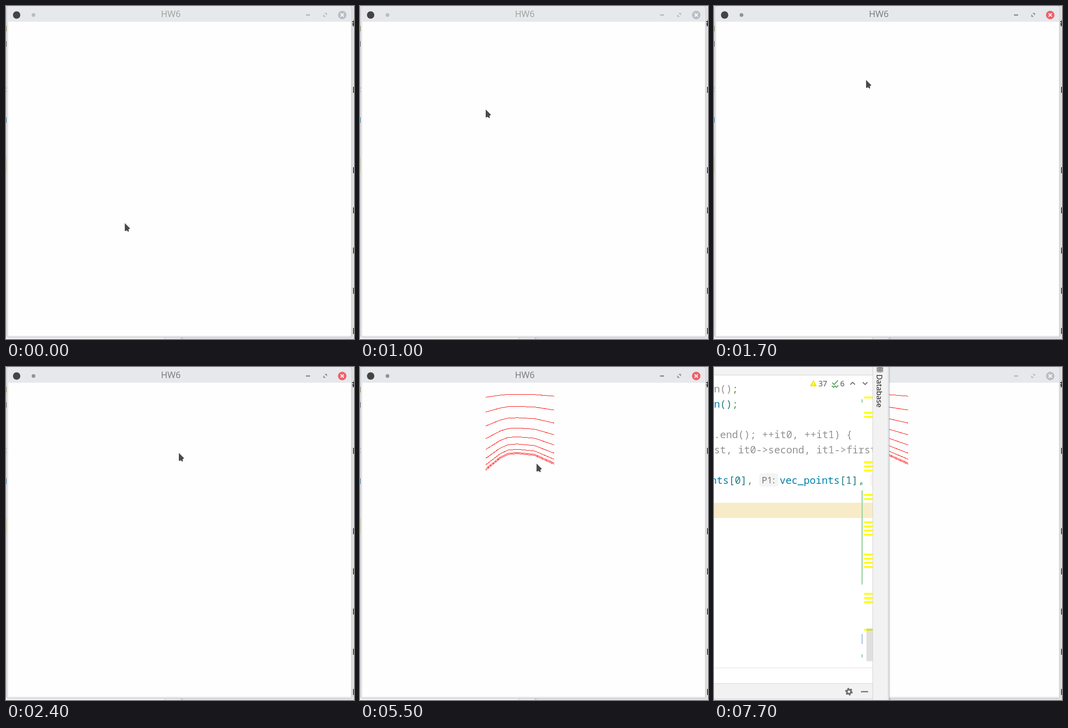
An HTML page for the animation above (8 s loop, 753 by 721 pixels).

```html
<!DOCTYPE html>
<html lang="en">
<head>
<meta charset="utf-8">
<title>HW6</title>
<style>
html, body { margin: 0; width: 100%; height: 100%; overflow: hidden; background: #e2e2e2 }
svg { display: block; font-family: "Noto Sans", "Open Sans", sans-serif }
.code { font: 21.7px "Noto Sans Mono", "DejaVu Sans Mono", monospace; white-space: pre; fill: #929292 }
.name { fill: #0080aa }
.bracket { fill: #207c80 }
.mark { fill: #5a9a3c }
.crisp { shape-rendering: crispEdges }
#bar { --ink: #b9bdc4; --close: #b9bec6; --title: #a3a5a3 }
#bar.active { --ink: #8f9298; --close: #f0606a; --title: #7b7f86 }
.ink { fill: var(--ink) }
</style>
</head>
<body>
<svg width="753" height="721" viewBox="0 0 753 721">
  <defs>
    <linearGradient id="shade">
      <stop offset="0" stop-opacity=".15"/>
      <stop offset="1" stop-opacity="0"/>
    </linearGradient>
    <clipPath id="editor"><path d="M0 18H343V651H0z"/></clipPath>
  </defs>

  <!-- desktop behind the window -->
  <g class="crisp">
    <path fill="#e2e2e2" d="M0 0H753V721H0z"/>
    <path fill="#e9e9e9" d="M0 0H3V721H0z"/>
    <path fill="#cfcfcf" d="M0 17H3v1H0zM0 651H3v1H0zM0 685H3v1H0z"/>
    <path fill="#dcd6ae" d="M0 327H3V360H0z"/>
    <path fill="#8d8544" d="M0 43H2V55H0z"/>
    <path fill="#555" d="M0 76H2V88H0z"/>
    <path fill="#aaa" d="M0 176h2v3H0zM0 183h2v3H0z"/>
    <path fill="#2c7fa8" d="M0 241H2V253H0z"/>
    <path fill="#f5f5f5" d="M0 717H343V721H0z"/>
    <path fill="#ececec" d="M344 717H378V721H344z"/>
    <path fill="#bbb" d="M343 717h1v4h-1z"/>
    <path fill="url(#shade)" d="M378 717h6v4h-6z"/>
    <g id="marks" fill="#6b3a1e"></g>
  </g>
  <text class="code" x="748" y="44" style="fill: #333; font-weight: bold">#</text>

  <!-- application window -->
  <path fill="#e6e8eb" stroke="#bfc1c4" d="M1.500 8Q1.500 -1 8 -1H741Q748.500 -1 748.500 8V713Q748.500 717.500 744 717.500H6Q1.500 717.500 1.500 713z"/>
  <path class="crisp" fill="#fefefe" d="M5 34H746V714H5z"/>
  <g id="bar">
    <circle cx="23" cy="19.500" r="8" fill="#444"/>
    <circle class="ink" cx="59.500" cy="19.500" r="4"/>
    <text x="356.500" y="24" font-size="19" text-anchor="middle" fill="var(--title)">HW6</text>
    <path class="ink" d="M649 18h9v3h-9zM689 15h5.500v5.500zM686.500 18v5.500h5.500z"/>
    <circle cx="727.500" cy="19.500" r="9.200" fill="var(--close)"/>
    <path stroke="#fff" stroke-width="2" d="M724 16l7 7m0-7l-7 7"/>
  </g>
  <path id="curves" class="crisp" fill="none" stroke="#f00"/>
  <path id="cursor" fill="#4a4a4a" stroke="#fff" stroke-width="2.500" stroke-linejoin="round" paint-order="stroke"
    d="M0 0V17.500L4.500 16L7.500 19L9 17.500L8 14L11.500 11.500z"/>

  <!-- code editor that comes to the front -->
  <g id="ide">
    <g class="crisp">
      <path fill="#f2f2f2" d="M0 0H378V721H0z"/>
      <path fill="#fff" d="M0 18H343V685H0z"/>
      <path fill="#d1d1d1" d="M0 17H343v1H0zM0 685H343v1H0zM0 718H343v1H0zM343 0h1V721h-1z"/>
      <path fill="#dedede" d="M0 651H343v1H0z"/>
      <path fill="#f7ecc7" d="M0 294H343V327H0z"/>
      <path fill="#e6e8eb" d="M375 0h3V721h-3z"/>
      <path fill="#c2c4c6" d="M378 0h1V721h-1z"/>
      <path fill="url(#shade)" d="M379 0h3V721h-3z"/>
    </g>
    <g clip-path="url(#editor)">
      <g class="code">
        <text y="55">n()<tspan class="mark">;</tspan></text>
        <text y="88"><tspan class="name">n</tspan><tspan class="bracket">()</tspan><tspan class="mark">;</tspan></text>
        <text y="154">.end(); ++it0, ++it1) {</text>
        <text y="187">st, it0-&gt;second, it1-&gt;first</text>
        <text x="-7" y="253" class="name">nts<tspan class="bracket">[0]</tspan><tspan class="mark">,</tspan></text>
        <text x="142" y="253" class="name">vec_points<tspan class="bracket">[1]</tspan><tspan class="mark">,</tspan></text>
      </g>
      <rect x="98" y="230" width="41" height="29" rx="5" fill="#f4f4f4"/>
      <rect x="338" y="230" width="41" height="29" rx="5" fill="#f4f4f4"/>
      <text x="103" y="252" font-size="20" fill="#7d7d7d">P1:</text>
      <path fill="#f5e616" stroke="#f5e616" stroke-width="2" stroke-linejoin="round" d="M215 30L221 41H209z"/>
      <path stroke="#fff" stroke-width="2" d="M215 33v4m0 1v2"/>
      <g font-size="16.500" fill="#555">
        <text x="226" y="42">37</text>
        <text x="273" y="42">6</text>
      </g>
      <g fill="none" stroke-width="2.200">
        <path stroke="#59a869" d="M256 34l4 4 8-9M255 41l4 3 3-3 3 3 4-4"/>
        <path stroke="#666" stroke-width="1.800" d="M295 38l5-5 5 5M322 33l5 5 5-5"/>
      </g>
      <g class="crisp">
        <g id="stripes" fill="#ff0"></g>
        <path fill="#a9d8ae" d="M319 70h3v7h-3zM319 267h3v204h-3zM319 622h3v7h-3z"/>
        <path fill="#b5d1ee" d="M319 249h3v7h-3zM319 578h3v22h-3z"/>
        <path fill="#777" fill-opacity=".23" d="M330 566h13v71h-13z"/>
      </g>
    </g>
    <path fill="#666" d="M352 -1h14v11q-7 3-14 0z"/>
    <path fill="none" stroke="#f2f2f2" stroke-width="1.200" d="M352 1q7 3 14 0M352 4.500q7 3 14 0M352 8q7 3 14 0"/>
    <text transform="translate(352 16) rotate(90)" font-size="16.200" fill="#222">Database</text>
    <g fill="none" stroke="#6e6e6e">
      <circle cx="292" cy="703" r="4.500" stroke-width="3.600"/>
      <circle cx="292" cy="703" r="7" stroke-width="2.500" stroke-dasharray="3.665"/>
      <path stroke-width="2.500" d="M318 703h15.500"/>
    </g>
  </g>
</svg>
<script>
const $ = id => document.getElementById(id);

// n bars below each other, the first at y
const bars = (x, y, w, h, n, step) => Array.from({ length: n }, (_, i) =>
  `<rect x="${x}" y="${y + i * step}" width="${w}" height="${h}"/>`).join("");

$("marks").innerHTML = bars(751, 175, 2, 13, 1, 0) + bars(751, 349, 2, 13, 5, 87);
$("stripes").innerHTML = [[64, 1], [97, 2], [204, 3], [275, 2], [334, 4], [404, 4], [489, 3], [567, 1]]
  .map(([y, n]) => bars(325, y, 18, 4, n, 9)).join("");

// The profile is turned about a horizontal axis in steps of 10 degrees.
const axis = 32.2;
const profile = [[272, 223.5], [303, 198], [320, 189.5], [340, 187.5], [378, 191.5], [420, 210.5]];
const turned = (_, i) => "M" + profile.map(([x, y]) =>
  [x, axis + (y - axis) * Math.cos(i * Math.PI / 18)]).join("L");
$("curves").setAttribute("d", Array.from({ length: 9 }, turned).join(""));

// pointer moves: from, to, dx, dy
const moves = [[0, 700, 15, -259], [800, 1000, 0, 13], [1200, 1700, 57, -64],
  [2100, 2700, 90, 51], [5400, 5500, -37, -2], [5500, 5700, -345, 104]];

function tip(t) {
  let x = 257, y = 470;
  for (const [from, to, dx, dy] of moves) {
    const u = Math.min(1, Math.max(0, (t - from) / (to - from)));
    const e = u * u * (3 - 2 * u);
    x += dx * e;
    y += dy * e;
  }
  return [Math.round(x), Math.round(y)];
}

const show = (id, on) => $(id).style.display = on ? "" : "none";

function draw(now) {
  const t = Math.floor(now % 8000 / 100) * 100;
  $("cursor").setAttribute("transform", `translate(${tip(t)})`);
  $("bar").classList.toggle("active", t >= 1200 && t < 7700);
  show("cursor", t < 5800);
  show("curves", t >= 2900);
  show("ide", t >= 7700);
}

const start = performance.now();
function tick() {
  draw(performance.now() - start);
  requestAnimationFrame(tick);
}
tick();
</script>
</body>
</html>
```
